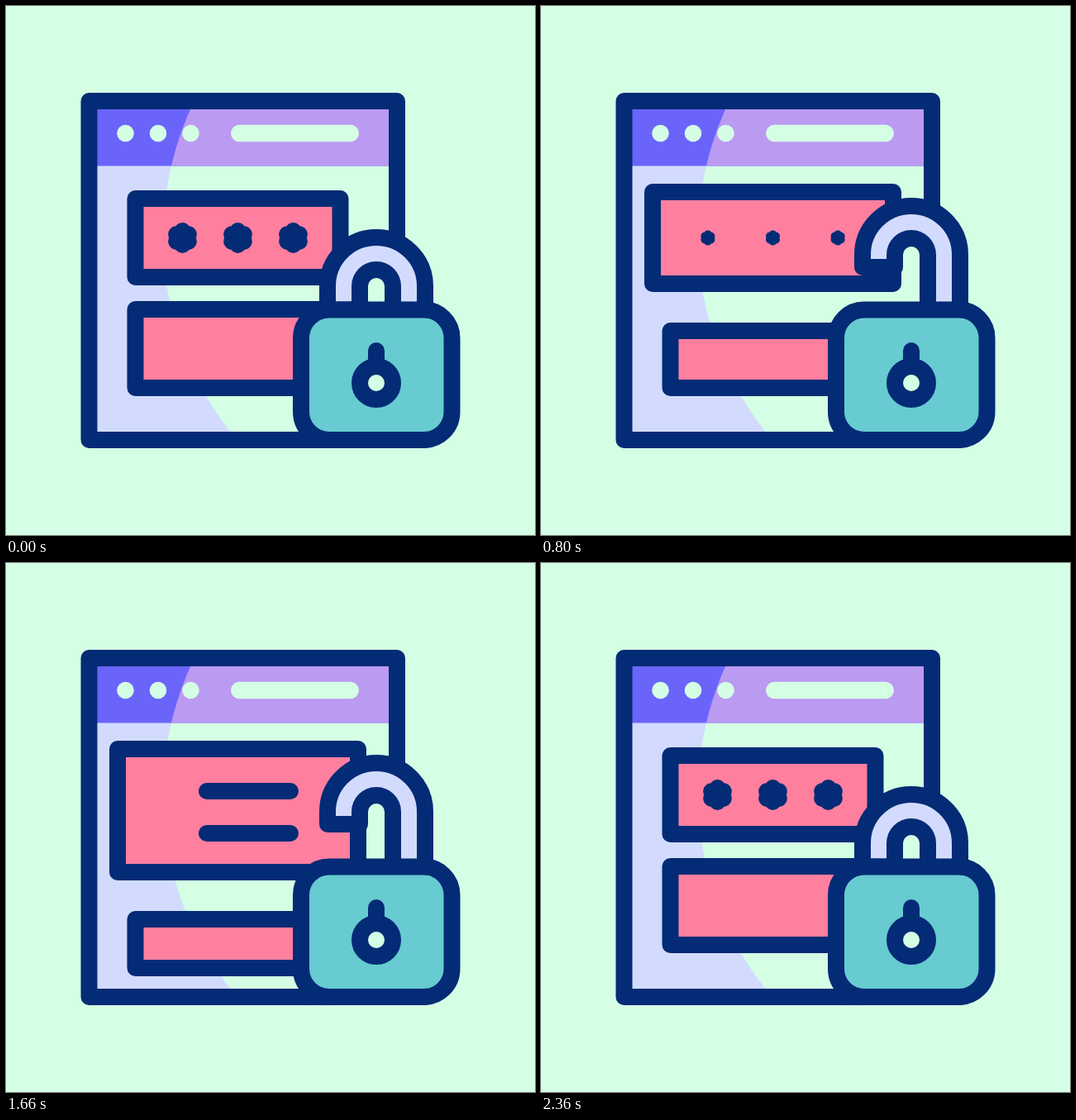
An HTML page for the animation above (2.4 s loop, 640 by 640 pixels).

```html
<!DOCTYPE html>
<html>
<head>
<meta charset="utf-8">
<style>
  html, body { margin: 0; height: 100%; overflow: hidden; background: #d4ffe4; }
  svg { display: block; width: 100%; height: 100%; }
  .line { stroke: #042b75; stroke-width: 20; stroke-linejoin: round; stroke-linecap: round; fill: none; }
  .pink { fill: #ff7f9f; }
  .mint { fill: #d4ffe4; }
  .lilac { fill: #d2dbfe; }
</style>
</head>
<body>
<svg viewBox="0 0 640 640">
  <clipPath id="inside"><rect x="100" y="115" width="373" height="410"/></clipPath>
  <clipPath id="header"><rect x="100" y="115" width="373" height="78.5"/></clipPath>

  <rect class="lilac" x="100" y="115" width="373" height="410"/>
  <circle class="mint" cx="570" cy="280" r="380" clip-path="url(#inside)"/>
  <g clip-path="url(#header)">
    <rect x="100" y="115" width="373" height="79" fill="#6a64fb"/>
    <circle cx="570" cy="280" r="380" fill="#bb9af2"/>
  </g>
  <g class="mint">
    <circle cx="144.5" cy="154" r="10.3"/>
    <circle cx="184" cy="154" r="10.3"/>
    <circle cx="223.5" cy="154" r="10.3"/>
    <rect x="272" y="143.7" width="155" height="20.6" rx="10.3"/>
  </g>
  <rect class="line" x="100.5" y="115" width="372.5" height="410"/>

  <rect id="lower" class="line pink" x="156.5" width="248"/>
  <rect id="upper" class="line pink"/>
  <g id="stars" class="line"></g>
  <path id="bars" class="line"/>

  <g id="lock">
    <path id="shackle" class="line lilac"/>
    <rect class="line" x="357" y="367.5" width="182.5" height="157.5" rx="34" style="fill:#67cbd1"/>
    <path class="line" d="M448 417V440"/>
    <circle class="line mint" cx="448" cy="456" r="20"/>
  </g>
</svg>
<script>
const LOOP = 2400;
const $ = id => document.getElementById(id);
const set = (el, attrs) => { for (const k in attrs) el.setAttribute(k, attrs[k]); };

// Eased 0..1 progress between two times
const ease = (t, from, to) => {
  const p = Math.min(1, Math.max(0, (t - from) / (to - from)));
  return p * p * (3 - 2 * p);
};
// Rises over [a, b] and falls back over [c, d]
const pulse = (t, a, b, c, d) => ease(t, a, b) - ease(t, c, d);

// Three crossing strokes per password star
const STAR = [30, 90, 150].map(deg => {
  const a = deg * Math.PI / 180, x = 8.5 * Math.cos(a), y = 8.5 * Math.sin(a);
  return `M${-x} ${-y}L${x} ${y}`;
}).join('');
$('stars').innerHTML = `<path d="${STAR}"/>`.repeat(3);

function draw(t) {
  const widen = pulse(t, 440, 780, 1740, 2060);
  const extend = pulse(t, 865, 1235, 1740, 2060);
  const open = pulse(t, 480, 780, 2100, 2240);
  const jump = pulse(t, 120, 280, 280, 440) + pulse(t, 1940, 2100, 2220, 2360);
  const starSize = 1 - pulse(t, 700, 900, 2200, 2360);

  const half = 124 + 21.5 * widen;
  set($('upper'), {
    x: 280.5 - half, y: 233 - 8 * widen,
    width: 2 * half, height: 95 + 16 * widen + 38 * extend
  });
  const top = 367 + 26 * widen + 38 * extend;
  set($('lower'), { y: top, height: 462 + 28 * extend - top });

  [...$('stars').children].forEach((star, i) => {
    const x = 280.5 + (i - 1) * 67 * half / 124;
    set(star, { transform: `translate(${x} 280.5) scale(${starSize})` });
  });

  // Text lines are written, then wiped, from left to right
  const start = 217 + 127 * ease(t, 1600, 1810), end = 217 + 127 * ease(t, 1240, 1480);
  set($('bars'), { d: end > 217 && start < 344 ? `M${start} 276H${end}M${start} 327H${end}` : '' });

  const arc = 339 - 38 * open, tip = 367.5 - 51.5 * open;
  set($('shackle'), {
    d: `M389 ${tip}V${arc}A59 59 0 0 1 507 ${arc}V400H468V${arc}A20 20 0 0 0 428 ${arc}V${tip}Z`
  });
  set($('lock'), { transform: `translate(0 ${-46 * jump})` });
}

function frame() {
  draw(performance.now() % LOOP);
  requestAnimationFrame(frame);
}
frame();
</script>
</body>
</html>
```
